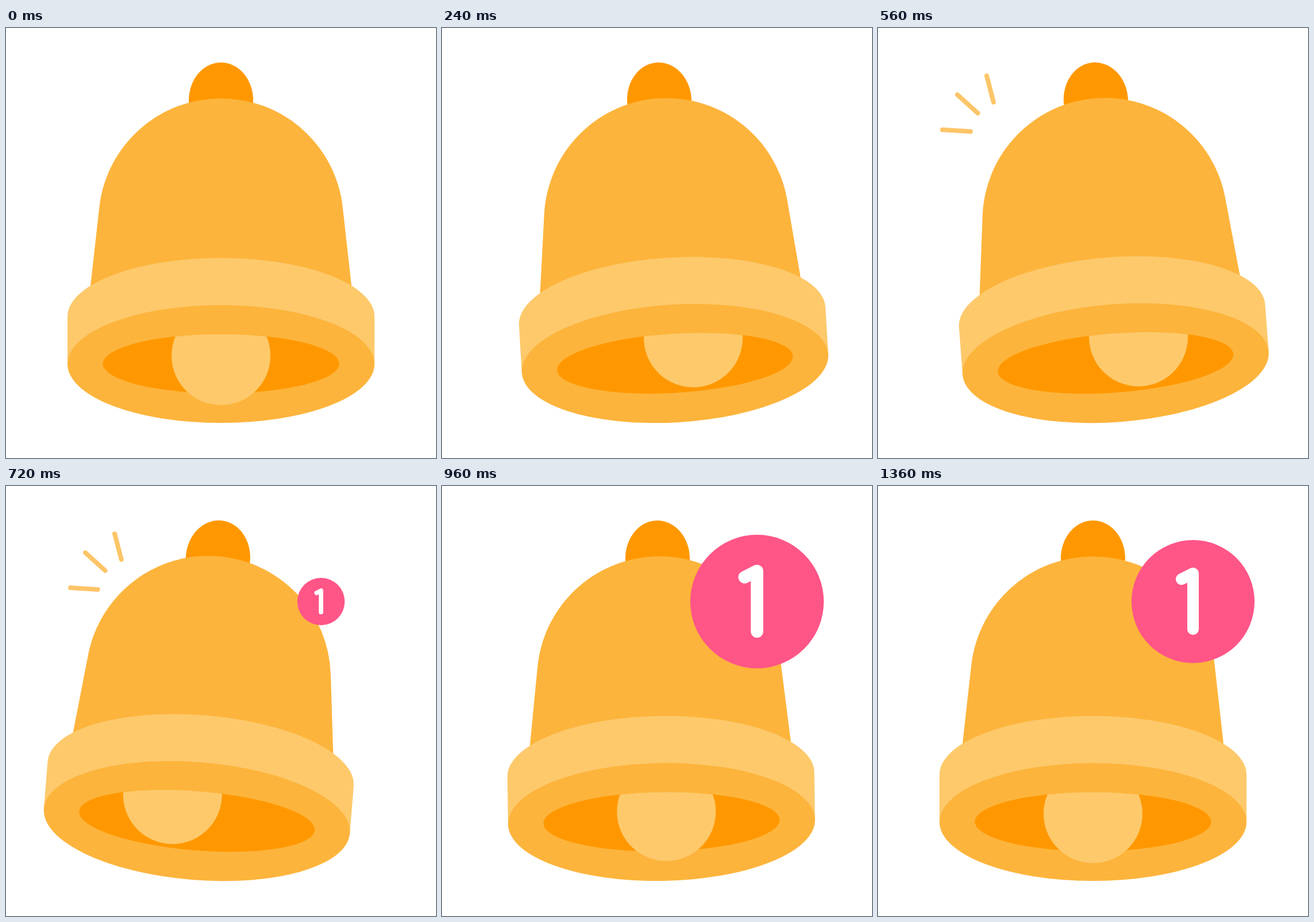
Recreate the animation shown at these times as an HTML page. Size 748 px wide and 748 px high, loop 2000 ms.

```html
<!DOCTYPE html>
<html lang="en">
<head>
<meta charset="utf-8">
<title>Bell notification</title>
<style>
  html, body { margin: 0; height: 100%; overflow: hidden; background: #fff; }
  svg { display: block; width: 100%; height: 100%; }
  .mid { fill: #fdb43c; }
  .light { fill: #fdc96b; }
  .dark { fill: #ff9800; }
  #rays { stroke: #fdc568; stroke-width: 8; stroke-linecap: round; }
</style>
</head>
<body>
<svg viewBox="0 0 748 748">
  <clipPath id="mouth"><path d="M168.500 584A205.500 51.500 0 0 1 579.500 584V748H168.500Z"/></clipPath>
  <g id="bell">
    <ellipse class="dark" cx="374" cy="126" rx="56" ry="66"/>
    <path class="mid" d="M144 475L162.400 311A213 213 0 0 1 585.600 311L604 475Z"/>
    <path class="light" d="M107 585V502A267 102 0 0 1 641 502V585Z"/>
    <ellipse class="mid" cx="374" cy="584.500" rx="267" ry="102.500"/>
    <ellipse class="dark" cx="374" cy="584" rx="205.500" ry="51.500"/>
    <g clip-path="url(#mouth)"><circle id="clapper" class="light" r="86"/></g>
  </g>
  <g id="rays"></g>
  <g id="badge" role="img" aria-label="1">
    <circle r="107" fill="#ff5587"/>
    <path d="M-20 -39L0 -49V48" fill="none" stroke="#fff" stroke-width="20" stroke-linecap="round" stroke-linejoin="round"/>
  </g>
</svg>
<script>
const LOOP = 2000, STEP = 80;
const $ = id => document.getElementById(id);
const bell = $('bell'), clapper = $('clapper'), rays = $('rays'), badge = $('badge');

// Turning points of the swing: [ms, degrees]
const swing = [[0, 0], [175, 11], [340, -11.5], [484, 10.5], [675, -7.6], [825, 7], [1000, 0]];

// Rays as inner end, outer end
const lines = [[201, 129, 189, 83], [173.5, 148, 138, 116], [161, 180, 112, 177]].map(ends => {
  const el = document.createElementNS('http://www.w3.org/2000/svg', 'line');
  rays.append(el);
  return { el, ends };
});

const progress = (t, from, to) => Math.min(1, Math.max(0, (t - from) / (to - from)));
const mix = (a, b, u) => a + (b - a) * u;
const easeSine = u => (1 - Math.cos(Math.PI * u)) / 2;
const easeOutBack = u => 1 + 2.70158 * (u - 1) ** 3 + 1.70158 * (u - 1) ** 2;

function swingAngle(t) {
  const i = swing.findIndex(([time]) => time > t);
  if (i < 0) return 0;
  const [t0, a0] = swing[i - 1], [t1, a1] = swing[i];
  return mix(a0, a1, easeSine(progress(t, t0, t1)));
}

function draw(t) {
  const angle = swingAngle(t);
  const lift = easeSine(progress(t, 0, 175)) - easeSine(progress(t, 825, 1000));
  bell.setAttribute('transform', `rotate(${-angle} 374 60)`);
  clapper.setAttribute('cx', 374 + 10 * angle);
  clapper.setAttribute('cy', 570 - 28 * lift);

  const head = 1 - (1 - progress(t, 240, 540)) ** 2;
  const tail = progress(t, 680, 920) ** 2;
  rays.style.display = head > tail ? '' : 'none';
  for (const { el, ends: [x0, y0, x1, y1] } of lines) {
    el.setAttribute('x1', mix(x0, x1, tail));
    el.setAttribute('y1', mix(y0, y1, tail));
    el.setAttribute('x2', mix(x0, x1, head));
    el.setAttribute('y2', mix(y0, y1, head));
  }

  const scale = Math.max(0, easeOutBack(progress(t, 664, 1264)));
  badge.style.display = t > 664 ? '' : 'none';
  badge.setAttribute('transform', `translate(548 201) scale(${scale})`);
}

function frame() {
  const t = performance.now() % LOOP;
  draw(Math.floor(t / STEP) * STEP);
  requestAnimationFrame(frame);
}
frame();
</script>
</body>
</html>
```
